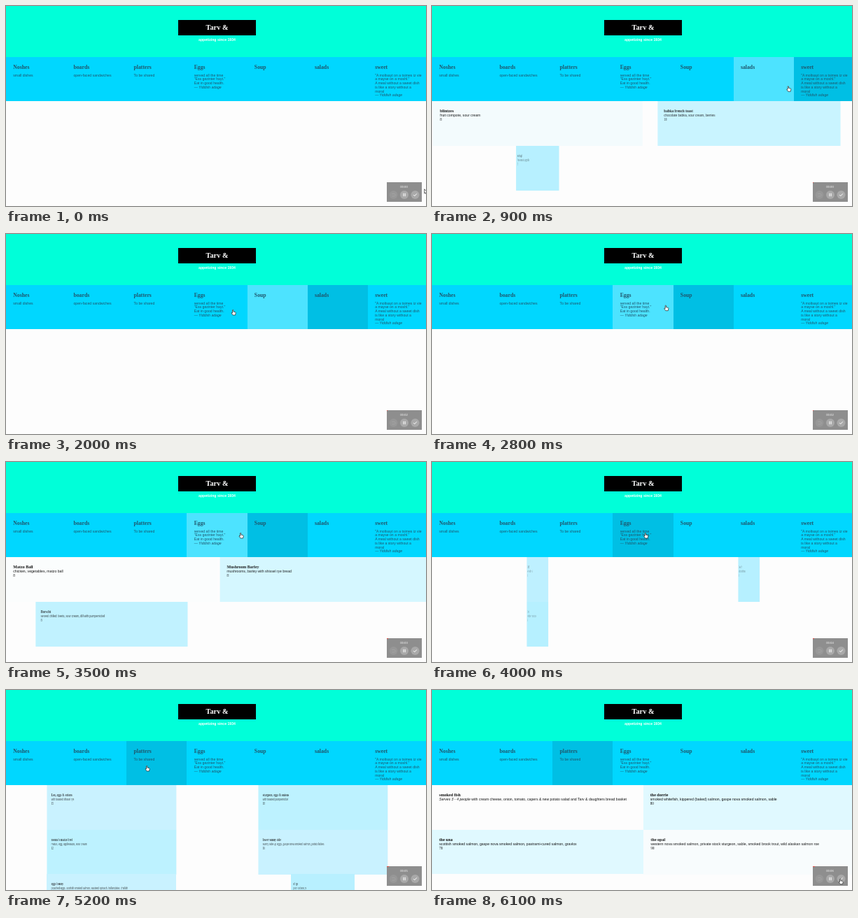
Animation of 600x286 px, one loop 6.2 s. Source, as an HTML page:

```html
<!DOCTYPE html>
<html lang="en">
<head>
<meta charset="utf-8">
<style>
  html, body { margin: 0; width: 100%; height: 100%; overflow: hidden; }
  body { position: relative; background: #fdfdfd; font: 5.15px/5.75px "Liberation Sans", Arial, sans-serif; }
  div, b, span, svg { position: absolute; white-space: nowrap; }
  h2, h3, p { margin: 0; }
  h2, h3, .logo, .price { font-family: "Liberation Serif", "Times New Roman", serif; }
  #stage { width: 600px; height: 286px; overflow: hidden; }
  header { position: absolute; width: 603px; height: 72.5px; background: #00ffd9; color: #fff; font-weight: bold; text-align: center; }
  .logo { left: 246px; top: 19.5px; width: 111px; height: 22px; background: #000; font-size: 10.3px; line-height: 22px; }
  .tag { left: 0; top: 46px; width: 603px; }
  .tab { top: 72.5px; width: 86.2px; height: 63.5px; color: #1f566c; }
  .tab h2 { position: absolute; left: 10.3px; top: 10.5px; font-size: 7.72px; line-height: 9px; }
  .tab p { position: absolute; left: 10.3px; top: 24px; }
  .card { width: 301.5px; height: 63.5px; color: #111; line-height: 6px; }
  .card > div { left: 10.3px; top: 11px; }
  .card h3 { font-size: 6.03px; }
  #recorder { left: 543.5px; top: 252px; width: 50px; height: 28px; background: #8e8e8e; color: #fff; }
  #clock { width: 50px; top: 4px; text-align: center; font-size: 4.2px; }
  #bar { height: 1px; background: #e0504a; }
</style>
</head>
<body>
<div id="stage">
  <header><div class="logo">Tarv &amp;</div><div class="tag">appetizing since 1934</div></header>
  <div id="tabs"></div>
  <div id="cards"></div>
  <div id="recorder">
    <div id="clock"></div><div id="bar"></div>
    <svg width="50" height="28" fill="none" stroke="#fff">
      <g fill="#a9a9a9" stroke="none"><circle cx="9.5" cy="18" r="6" fill="#979797"/><circle cx="25" cy="18" r="6"/><circle cx="40.5" cy="18" r="6"/></g>
      <path d="M7.5 16.5h3a1.5 1.5 0 0 1 0 3.5h-3" stroke="#a8a8a8" stroke-width=".7"/>
      <path d="M24 15.8v4.4M26.2 15.8v4.4M38.2 18l1.6 1.7 3-3.3"/>
    </svg>
  </div>
  <svg id="cursor" width="12" height="12" viewBox="-6 -6 12 12" fill="#fff" stroke="#222" stroke-width=".7" stroke-linejoin="round">
    <path id="hand" d="M-1.5 1V-3.2q.7-1 1.4 0V-.9L2.6-.3Q3.4 0 3.2 1L2.6 4H-.9L-3 1Q-2.9-.1-1.5 1z"/>
    <path id="arrow" d="M-1.3-3.2V3L0 1.8 1 4l1-.5-1-2.1h1.8z"/>
  </svg>
</div>
<script>
const LOOP = 6200, FLIP = 750, STAGGER = 200, COL = 301.5, ROW = 63.5, TOP = 136;
const $ = id => document.getElementById(id);

const tabs = [
  ['Noshes', 'small dishes'],
  ['boards', 'open-faced sandwiches'],
  ['platters', 'To be shared'],
  ['Eggs', 'served all the time<br>"Ess gezinter hayt."<br>Eat in good health.<br><i>— Yiddish adage</i>'],
  ['Soup', ''],
  ['salads', ''],
  ['sweet', '"A moltsayt on a tsimes iz vie<br>a mayse on a moshl."<br>A meal without a sweet dish<br>is like a story without a<br>moral<br><i>— Yiddish adage</i>']
];

// enter and leave are the times at which the cards start to flip in and out
const menus = [
  { enter: 410, leave: 1290, items: [
    ['blintzes', 'fruit compote, sour cream', 8],
    ['babka french toast', 'chocolate babka, sour cream, berries', 10],
    ['noodle kugel', 'farmer cheese, raisins, egg noodles', 7],
    ['challah bread pudding', 'dried apricots, caramel sauce', 8],
    ['Halvah', 'ice cream, salted caramel', 9],
    ['rugelach', 'cinnamon, walnuts', 5]] },
  { enter: 2877, leave: 3485, items: [
    ['Matzo Ball', 'chicken, vegetables, matzo ball', 8],
    ['Mushroom Barley', 'mushrooms, barley with shissel rye bread', 8],
    ['Borscht', 'served chilled: beets, sour cream, dill with pumpernickel', 8]] },
  { enter: 4085, leave: 4949, items: [
    ['Lox, eggs &amp; onions', 'with toasted shissel rye', 15],
    ['sturgeon, eggs &amp; onions', 'with toasted pumpernickel', 18],
    ["nonna's matzo brei", 'matzo, egg, applesauce, sour cream', 12],
    ['lower sunny side', 'sunny side up eggs, gaspe nova smoked salmon, potato latkes', 16],
    ['eggs benny', 'poached eggs, scottish smoked salmon, sauteed spinach, hollandaise, challah', 18],
    ['soft eggs', 'pastrami-cured salmon, rye', 14]] },
  { enter: 4949, leave: Infinity, items: [
    ['smoked fish', '<i>Serves 3 - 4 people</i> with cream cheese, onion, tomato, capers &amp; new potato salad and Tarv &amp; daughters bread basket', ''],
    ['the dorrie', 'smoked whitefish, kippered (baked) salmon, gaspe nova smoked salmon, sable', 80],
    ['the una', 'scottish smoked salmon, gaspe nova smoked salmon, pastrami-cured salmon, gravlox', 70],
    ['the opal', 'western nova smoked salmon, private stock sturgeon, sable, smoked brook trout, wild alaskan salmon roe', 90]] }
];

// [time, tab index]
const active = [[0, -1], [430, 6], [1320, 5], [2030, 4], [3510, 3], [4960, 2]];
const hover = [[0, -1], [330, 6], [900, 5], [1700, 4], [2030, 3], [4800, 2], [5400, -1]];
// [time, x, y]
const path = [[0, 599, 265], [100, 598, 264], [380, 556, 112], [700, 553, 114], [1050, 482, 121], [1300, 482, 121],
  [1500, 470, 118], [1850, 378, 112], [2000, 325, 112], [2300, 334, 106], [3600, 336, 105], [4200, 295, 105],
  [4550, 295, 105], [4900, 202, 112], [5250, 202, 112], [5500, 240, 150], [5950, 584, 273], [6200, 584, 274]];

const clamp = v => Math.min(1, Math.max(0, v));
const lerp = (a, b, k) => a + (b - a) * k;
const latest = (list, t) => list.filter(e => e[0] <= t).pop()[1];

// cubic-bezier(.25, .1, .25, 1)
function ease(x) {
  if (x <= 0) return 0;
  if (x >= 1) return 1;
  const bez = (a, b, s) => 3 * a * s * (1 - s) ** 2 + 3 * b * s * s * (1 - s) + s ** 3;
  let lo = 0, hi = 1;
  for (let i = 0; i < 20; i++) {
    const mid = (lo + hi) / 2;
    if (bez(.25, .25, mid) < x) lo = mid; else hi = mid;
  }
  return bez(.1, 1, lo);
}

function add(parent, cls, html) {
  const el = document.createElement('div');
  el.className = cls;
  el.innerHTML = html;
  return parent.appendChild(el);
}

const tabEls = tabs.map(([name, note], i) => {
  const el = add($('tabs'), 'tab', `<h2>${name}</h2><p>${note}</p>`);
  el.style.left = i * 603 / 7 + 'px';
  return el;
});
for (const menu of menus)
  menu.cards = menu.items.map(([name, note, price]) =>
    add($('cards'), 'card', `<div><h3>${name}</h3><p>${note}</p><p class="price">${price}</p></div>`));

function drawCard(el, i, slot, p) {
  const width = Math.cos((1 - p) * Math.PI / 2), s = el.style;
  s.display = width > .01 ? 'block' : 'none';
  s.left = slot % 2 * COL + 'px';
  s.top = TOP + Math.floor(slot / 2) * ROW + 'px';
  s.transform = p < 1 ? `rotateY(${90 * (1 - p)}deg)` : 'none';
  const tinted = i % 4 === 1 || i % 4 === 2;
  const from = tinted ? [182, 240, 255] : [190, 240, 255];
  const to = tinted ? [224, 249, 255] : [253, 253, 253];
  s.background = `rgb(${from.map((c, k) => Math.round(lerp(c, to[k], p * p)))})`;
  el.firstChild.style.opacity = p ** .4;
}

function drawCursor(t) {
  const n = path.findIndex(k => k[0] > t), a = path[n - 1], b = path[n];
  let k = (t - a[0]) / (b[0] - a[0]);
  k = k * k * (3 - 2 * k);
  const x = lerp(a[1], b[1], k), y = lerp(a[2], b[2], k);
  $('cursor').style.transform = `translate(${x - 6}px, ${y - 6}px)`;
  const pointing = y > 72 && y < TOP || x > 577 && x < 591 && y > 266;
  $('hand').style.display = pointing ? '' : 'none';
  $('arrow').style.display = pointing ? 'none' : '';
}

function draw(t) {
  const on = latest(active, t), over = latest(hover, t);
  tabEls.forEach((el, i) => el.style.background = i === on ? '#00bfe4' : i === over ? '#4de3ff' : '#00d7ff');

  menus.forEach((menu, m) => {
    // leaving cards keep their slots until they are gone
    const prev = menus[m - 1];
    const offset = prev && t < prev.leave + FLIP ? prev.items.length : 0;
    const out = 1 - ease((t - menu.leave) / FLIP);
    menu.cards.forEach((el, i) =>
      drawCard(el, i, i + offset, Math.min(out, ease((t - menu.enter - i * STAGGER) / FLIP))));
  });

  $('clock').textContent = '00:0' + Math.floor(t / 1000);
  $('bar').style.width = clamp(t / LOOP) * 4 + 'px';
  drawCursor(t);
}

const start = performance.now();
function tick() {
  draw((performance.now() - start) % LOOP);
  requestAnimationFrame(tick);
}
tick();
</script>
</body>
</html>
```
